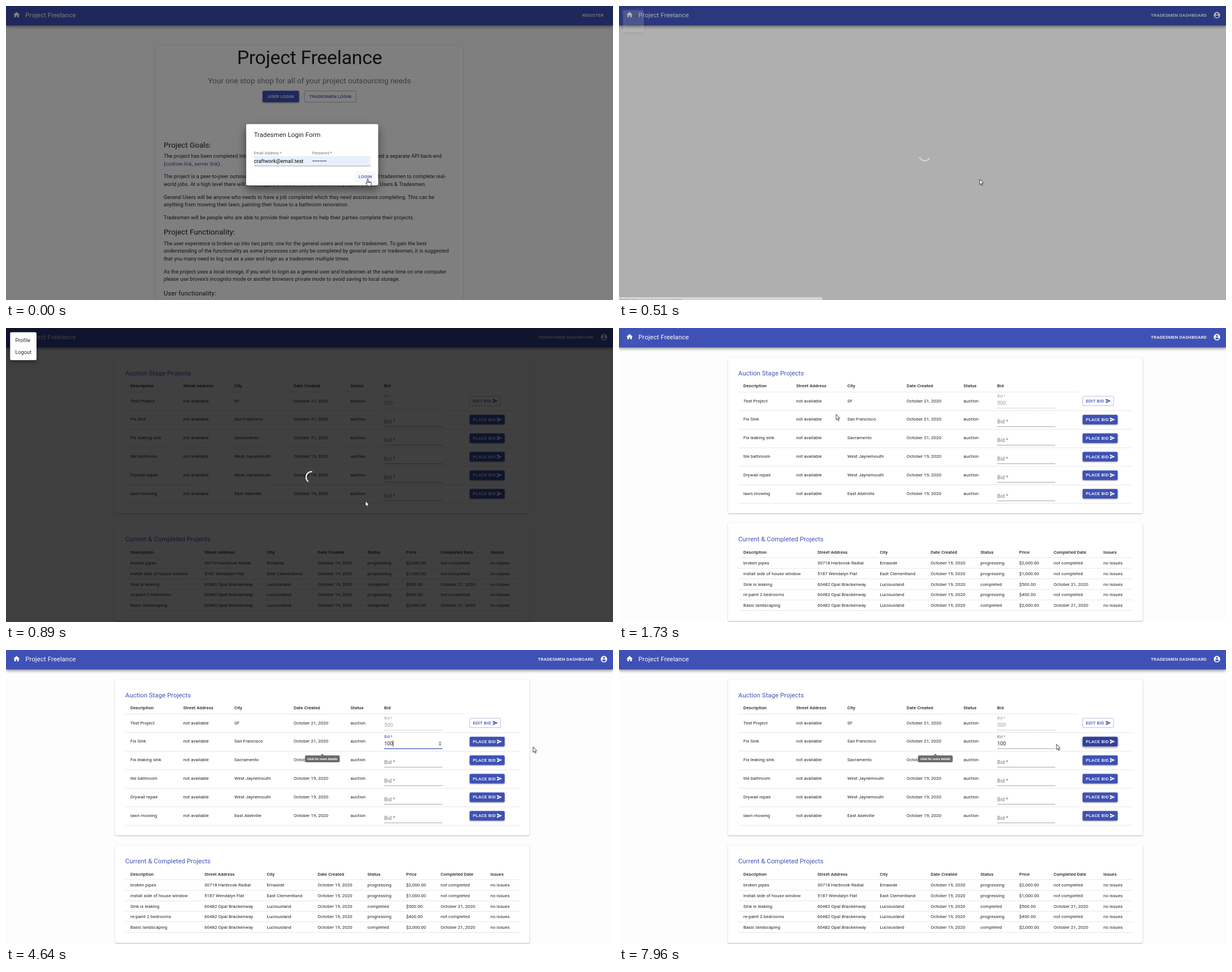
Recreate the animation shown at these times as an HTML page with a canvas. Size 1074 px wide and 521 px high, loop 8 s.

```html
<!DOCTYPE html>
<html lang="en">
<head>
<meta charset="utf-8">
<title>Tradesmen dashboard</title>
<style>
html, body { margin: 0; width: 100%; height: 100%; overflow: hidden; background: #fdfdfd; }
canvas { display: block; width: 1074px; height: 521px; }
</style>
</head>
<body>
<canvas id="stage" width="1074" height="521"></canvas>
<script>
const ctx = document.getElementById('stage').getContext('2d');
const W = 1074, H = 521, LOOP = 8000;
const S = 0.5645; // page zoom: CSS px to stage px
const BLUE = '#3f51b5', DARK = '#303f9f', INK = 'rgba(0,0,0,.87)', SOFT = 'rgba(0,0,0,.54)', OFF = 'rgba(0,0,0,.38)';
const HINT = 'click for more details';

const ICON = {
  home: 'M10 20v-6h4v6h5v-8h3L12 3 2 12h3v8z',
  send: 'M2 21L23 12 2 3v7l15 2-15 2z',
  user: 'M12 2C6.5 2 2 6.5 2 12s4.5 10 10 10 10-4.5 10-10S17.5 2 12 2zm0 3c1.7 0 3 1.3 3 3s-1.3 3-3 3-3-1.3-3-3 1.3-3 3-3zm0 14.2c-2.5 0-4.7-1.3-6-3.2 0-2 4-3.1 6-3.1s6 1.1 6 3.1c-1.3 1.9-3.5 3.2-6 3.2z'
};
const ARROW = new Path2D('M0 0V9.6L2.2 7.6L3.8 11L5.3 10.4L3.8 7H6.6Z');
const HAND = new Path2D('M-1 1q1-1.5 2 0V5l4.6 1.1q1 .3.9 1.5l-.7 4.3q-.2 1-1 1h-4q-.9 0-1.5-.8l-2.7-4q-.2-1.2 1-1l1.4 1.1z');

// Event times
const LOGIN = 330, LOADED = 890, FOCUS = 2630, SAVE = 5560, EDIT = 7570;

// Pointer path: time, x, y
const TRACK = [
  [0, 640, 306], [60, 640, 306], [180, 640.5, 307], [330, 639, 307], [420, 639, 307],
  [740, 636, 307], [890, 636, 307], [1120, 637, 185], [1500, 340, 120], [1730, 383.5, 153],
  [1980, 540, 158], [2300, 852, 164], [2450, 855, 288], [2700, 728, 170], [2840, 728.5, 169],
  [2990, 732, 169], [4390, 732, 169], [4470, 754, 168], [4640, 932.5, 171.5], [4850, 974, 225],
  [5000, 950, 288], [5250, 870, 200], [5410, 850.5, 160], [6240, 851, 160], [6500, 720, 166],
  [6650, 640, 170], [7040, 849, 166], [7270, 851, 162], [7570, 851, 162], [7960, 774, 167], [8000, 774, 167]
];

const AUCTION = {
  cols: [220, 313.5, 404, 509, 609.5, 669],
  head: ['Description', 'Street Address', 'City', 'Date Created', 'Status', 'Bid'],
  rows: [
    ['Test Project', 'SF', 21], ['Fix Sink', 'San Francisco', 21], ['Fix leaking sink', 'Sacramento', 21],
    ['tile bathroom', 'West Jaynemouth', 19], ['Drywall repair', 'West Jaynemouth', 19], ['lawn mowing', 'East Abelville', 19]
  ].map(([what, city, day]) => [what, 'not available', city, `October ${day}, 2020`, 'auction'])
};
const OPAL = '60482 Opal Brackenway', MADE = 'October 19, 2020', DONE = 'October 21, 2020';
const CURRENT = {
  cols: [220, 351, 461.5, 551.5, 639.5, 708, 769, 857],
  head: ['Description', 'Street Address', 'City', 'Date Created', 'Status', 'Price', 'Completed Date', 'Issues'],
  rows: [
    ['broken pipes', '30718 Harbrook Radial', 'Ernaside', '$2,000.00'],
    ['install side of house window', '5187 Wendalyn Flat', 'East Clementland', '$1,000.00'],
    ['Sink is leaking', OPAL, 'Luciousland', '$500.00', DONE],
    ['re-paint 2 bedrooms', OPAL, 'Luciousland', '$400.00'],
    ['Basic landscaping', OPAL, 'Luciousland', '$2,000.00', DONE]
  ].map(([what, street, city, price, done]) =>
    [what, street, city, MADE, done ? 'completed' : 'progressing', price, done || 'not completed', 'no issues'])
};

const ramp = (t, a, b) => Math.min(1, Math.max(0, (t - a) / (b - a)));
const within = (t, a, b) => t >= a && t < b;
const rowY = i => 129 + 32.85 * i;

// y is the middle of the capitals; size is in CSS px
function text(s, x, y, size, color, { weight = 400, gap = 0.01, align = 'left', face = 'Roboto' } = {}) {
  const px = size * S;
  ctx.font = `${weight} ${px}px ${face}, sans-serif`;
  ctx.letterSpacing = `${gap * px}px`;
  ctx.textAlign = align;
  ctx.fillStyle = color;
  ctx.fillText(s, x, y + 0.356 * px);
  return ctx.measureText(s).width;
}

function box(x, y, w, h, r, fill, shadow) {
  ctx.save();
  if (shadow) {
    [ctx.shadowOffsetY, ctx.shadowBlur] = shadow;
    ctx.shadowColor = `rgba(0,0,0,${shadow[2]})`;
  }
  ctx.fillStyle = fill;
  ctx.beginPath();
  ctx.roundRect(x, y, w, h, r);
  ctx.fill();
  ctx.restore();
}

function frame(x, y, w, h, r, color, width = 0.7) {
  ctx.strokeStyle = color;
  ctx.lineWidth = width;
  ctx.beginPath();
  ctx.roundRect(x, y, w, h, r);
  ctx.stroke();
}

function line(x1, x2, y, color, width = 0.8, dash = []) {
  ctx.strokeStyle = color;
  ctx.lineWidth = width;
  ctx.setLineDash(dash);
  ctx.beginPath();
  ctx.moveTo(x1, y);
  ctx.lineTo(x2, y);
  ctx.stroke();
  ctx.setLineDash([]);
}

function icon(name, cx, cy, size, color) {
  const k = size * S / 24;
  ctx.save();
  ctx.translate(cx, cy);
  ctx.scale(k, k);
  ctx.translate(-12, -12);
  ctx.fillStyle = color;
  ctx.fill(new Path2D(ICON[name]));
  ctx.restore();
}

function dim(alpha) {
  if (alpha <= 0) return;
  ctx.fillStyle = `rgba(0,0,0,${alpha})`;
  ctx.fillRect(0, 0, W, H);
}

// Draws scaled and faded around a point, for parts that grow in
function grown(k, cx, cy, draw) {
  if (k <= 0) return;
  const z = 0.75 + 0.25 * k;
  ctx.save();
  ctx.globalAlpha = k;
  ctx.translate(cx, cy);
  ctx.scale(z, z);
  ctx.translate(-cx, -cy);
  draw();
  ctx.restore();
}

const caps = (s, x, y, color, align) => text(s, x, y, 14, color, { weight: 500, gap: 0.02857, align });
const card = (x, y, w, h) => box(x, y, w, h, 2.2, '#fff', [0.8, 2, 0.34]);

function appBar(t) {
  box(0, -5, W, 39.5, 0, BLUE, [2, 5, 0.4]);
  const glow = t < LOGIN ? 0 : 0.05 * (1 - ramp(t, 1200, 1980));
  if (glow) box(5, 4, 38, 30, 2, `rgba(255,255,255,${glow})`);
  icon('home', 18.7, 15.5, 24, '#fff');
  text('Project Freelance', 34.3, 16.4, 20, '#fff', { gap: 0.0115 });
  if (t < LOGIN) return caps('REGISTER', 1057.5, 16, '#fff', 'right');
  caps('TRADESMEN DASHBOARD', 941, 16, '#fff');
  icon('user', 1058, 16.2, 24, '#fff');
}

function home() {
  const body = (s, y, end, x = 778.5) => {
    text(s, 279, y, 16, INK);
    if (end) text(end, x, y, 16, INK, { align: 'right' });
  };
  card(265, 70, 544, 600);
  text('Project Freelance', 537, 91, 60, INK, { gap: -0.00833, align: 'center' });
  text('Your one stop shop for all of your project outsourcing needs', 537, 132.2, 24, SOFT, { gap: 0, align: 'center' });
  box(454, 150.3, 64.5, 20.3, 2.2, BLUE, [1, 3, 0.4]);
  caps('USER LOGIN', 486.4, 160.3, '#fff', 'center');
  frame(528, 150.6, 91.8, 19.8, 2.2, 'rgba(63,81,181,.6)');
  caps('TRADESMEN LOGIN', 574, 160.3, BLUE, 'center');

  text('Project Goals:', 279, 246, 24, INK, { gap: 0 });
  body('The project has been completed into two parts;', 266, 'the client and a separate API back-end', 771);
  let x = 279;
  for (const [s, color] of [['(', INK], ['codrow link', BLUE], [', ', INK], ['server link', BLUE], [') .', INK]])
    x += text(s, x, 279.7, 16, color);
  body('The project is a peer-to-peer outsourcing app', 302, 'for users and tradesmen to complete real-');
  body('world jobs. At a high level there will be two types of users who will utilise this project: General Users & Tradesmen.', 315.7);
  body('General Users will be anyone who needs to have a job completed which they need assistance completing. This can be', 338.3);
  body('anything from mowing their lawn, painting their house to a bathroom renovation.', 352);
  body('Tradesmen will be people who are able to provide their expertise to help their parties complete their projects.', 374.7);
  text('Project Functionality:', 279, 400, 24, INK, { gap: 0 });
  body('The user experience is broken up into two parts: one for the general users and one for tradesmen. To gain the best', 420.5);
  body('understanding of the functionality as some processes can only be completed by general users or tradesmen, it is suggested', 434);
  body('that you many need to log out as a user and login as a tradesmen multiple times.', 447.6);
  body('As the project uses a local storage, if you wish to login as a general user and tradesmen at the same time on one computer', 470.3);
  body("please use brovex's incognito mode or another browsers private mode to avoid saving to local storage.", 484);
  text('User functionality:', 279, 509, 20, INK);
}

function loginDialog() {
  box(425, 209.3, 233.5, 108.7, 2.2, '#fff', [7, 16, 0.5]);
  text('Tradesmen Login Form', 438.7, 227.5, 20, INK, { gap: 0.0075 });
  text('Email Address *', 438.7, 260.8, 12, SOFT);
  text('Password *', 541.7, 260.8, 12, SOFT);
  box(438.7, 266, 206.3, 17.5, 0, '#e8f0fe');
  line(438.7, 645, 283.6, 'rgba(0,0,0,.42)');
  text('craftwork@email.test', 438.7, 274.3, 16, '#000');
  ctx.fillStyle = '#000';
  for (let i = 0; i < 8; i++) {
    ctx.beginPath();
    ctx.arc(543.6 + 3.15 * i, 274.6, 0.95, 0, 7);
    ctx.fill();
  }
  box(617.5, 292.6, 36.5, 20.3, 2.2, 'rgba(63,81,181,.04)');
  caps('LOGIN', 635.7, 302.6, BLUE, 'center');
}

function bidField(y, { value = '', off, focus, caret }) {
  const up = off || focus || value;
  const label = off ? OFF : focus ? BLUE : SOFT;
  if (up) text('Bid *', 669.2, y - 8, 12, label);
  else text('Bid *', 669.2, y + 4.3, 16, label);
  const w = value ? text(value, 669.2, y + 4.2, 16, off ? OFF : INK) : 0;
  if (off) line(669, 772, y + 13, 'rgba(0,0,0,.42)', 0.8, [1, 0.8]);
  else line(669, 772, y + 13, focus ? BLUE : 'rgba(0,0,0,.46)', focus ? 1.3 : 0.8);
  if (caret) box(669.2 + w, y - 1.5, 0.8, 11, 0, '#000');
  if (focus) {
    box(764.8, y - 0.5, 6.4, 9, 0, '#efefef');
    ctx.fillStyle = '#505050';
    ctx.fill(new Path2D(`M768 ${y + 1}l1.8 2h-3.6zM768 ${y + 7.2}l1.8-2h-3.6z`));
  }
}

function bidButton(y, edit, hover) {
  if (edit) {
    if (hover) box(820.5, y - 8, 54.5, 16.6, 2.2, 'rgba(63,81,181,.04)');
    frame(820.5, y - 8, 54.5, 16.6, 2.2, hover ? BLUE : 'rgba(63,81,181,.55)');
    caps('EDIT BID', 826, y + 0.2, BLUE);
    return icon('send', 865.7, y + 0.3, 18, BLUE);
  }
  box(820.3, y - 8, 62, 17, 2.2, hover ? DARK : BLUE, hover ? [1.5, 4, 0.5] : [1, 2.5, 0.4]);
  caps('PLACE BID', 826, y + 0.2, '#fff');
  icon('send', 873, y + 0.4, 18, '#fff');
}

function ripple(t, start, y, color) {
  const k = ramp(t, start, start + 300);
  if (k <= 0 || k >= 1) return;
  ctx.save();
  ctx.beginPath();
  ctx.roundRect(820.3, y - 8, 62, 17, 2.2);
  ctx.clip();
  ctx.globalAlpha = 0.3 * (1 - k);
  ctx.fillStyle = color;
  ctx.beginPath();
  ctx.arc(851, y, 6 + 40 * k, 0, 7);
  ctx.fill();
  ctx.restore();
}

function typed(t) {
  return t < 3770 ? '' : t < 4000 ? '1' : t < 4170 ? '10' : '100';
}

function caretOn(t) {
  const since = t < 3770 ? FOCUS : 4170;
  return Math.floor((t - since) / 530) % 2 === 0;
}

function fieldState(i, t) {
  if (i === 0) return { value: '500', off: true };
  if (i > 1) return {};
  if (within(t, SAVE, EDIT)) return { value: '100', off: true };
  const focus = within(t, FOCUS, 5480);
  return { value: typed(t), focus, caret: focus && caretOn(t) };
}

function tableHead({ cols, head }, y) {
  head.forEach((s, c) => text(s, cols[c], y, 14, INK, { weight: 500 }));
}

function tables(t, p) {
  card(193, 52.5, 733.5, 276);
  text('Auction Stage Projects', 211, 79.8, 20, BLUE, { gap: 0.0075 });
  tableHead(AUCTION, 102.6);
  line(211, 811.5, 113.5, '#e0e0e0');
  AUCTION.rows.forEach((row, i) => {
    const y = rowY(i);
    row.forEach((s, c) => text(s, AUCTION.cols[c], y - 0.2, 14, INK));
    bidField(y, fieldState(i, t));
    const edit = i === 0 || (i === 1 && within(t, SAVE, EDIT));
    bidButton(y, edit, overButton(p, i) || (i === 1 && t >= EDIT));
    line(211, 908.5, y + 17.5, '#e0e0e0');
  });
  ripple(t, 5480, rowY(1), t < SAVE ? '#fff' : BLUE);
  ripple(t, 7500, rowY(1), t < EDIT ? BLUE : '#fff');

  card(193, 346, 733.5, 173.3);
  text('Current & Completed Projects', 211, 374, 20, BLUE, { gap: 0.0075 });
  tableHead(CURRENT, 397);
  line(211, 908.5, 407, '#e0e0e0');
  CURRENT.rows.forEach((row, i) => {
    const y = 416.4 + 18.68 * i;
    row.forEach((s, c) => text(s, CURRENT.cols[c], y, 14, INK));
    line(211, 908.5, y + 9.5, '#e0e0e0');
  });
}

function menu() {
  box(7.3, 7.5, 46.7, 49.5, 2.2, '#fff', [3, 6, 0.4]);
  text('Profile', 16.4, 22, 16, INK);
  text('Logout', 16.4, 42.4, 16, INK);
}

function spinner(t) {
  const turn = (t - 740) / 1400 * Math.PI * 2;
  ctx.strokeStyle = '#fff';
  ctx.lineWidth = 2;
  ctx.beginPath();
  ctx.arc(541, 264.4, 10, Math.PI * 0.5 + turn, Math.PI * 1.27 + turn * 1.15);
  ctx.stroke();
}

function statusBar() {
  ctx.save();
  ctx.globalAlpha = 0.75;
  box(-3, 516, 363, 10, 2, '#dee1e6');
  text('Waiting for project-server.example...', 1, 521.8, 12, '#444', { face: 'Open Sans' });
  ctx.restore();
}

function rowTip() {
  box(529, 186.7, 61.5, 12.3, 2.2, 'rgba(97,97,97,.92)');
  ctx.fillStyle = 'rgba(97,97,97,.92)';
  ctx.fill(new Path2D('M556.8 186.7l3-3 3 3z'));
  text(HINT, 559.8, 192.9, 10, '#fff', { weight: 700, gap: 0, align: 'center' });
}

function nativeTip() {
  box(856, 169, 71.5, 13.7, 0, '#fff', [1, 2, 0.25]);
  frame(856.5, 169.5, 70.5, 12.7, 0, '#666', 0.9);
  text(HINT, 861, 176, 11.4, '#444', { face: 'Open Sans', gap: 0 });
}

function savedAlert() {
  box(472, 488.6, 140, 25.6, 2.2, '#edf7ed');
  ctx.strokeStyle = '#4caf50';
  ctx.lineWidth = 1;
  ctx.beginPath();
  ctx.arc(487.3, 501.2, 4.7, -0.5, 5.2);
  ctx.stroke();
  ctx.stroke(new Path2D('M485 500.8l2 2 4.6-4.8'));
  text('Bid Saved Successfully', 500.3, 501, 14, '#1e4620');
  ctx.strokeStyle = '#1e4620';
  ctx.stroke(new Path2D('M597.3 498.6l5.2 5.2m0-5.2l-5.2 5.2'));
}

function pointer(t) {
  const i = Math.max(1, TRACK.findIndex(k => k[0] > t));
  const [t0, x0, y0] = TRACK[i - 1], [t1, x1, y1] = TRACK[i];
  const k = ramp(t, t0, t1);
  return { x: x0 + (x1 - x0) * k, y: y0 + (y1 - y0) * k };
}

function overButton({ x, y }, i) {
  const right = i === 0 ? 875 : 882;
  return x > 820 && x < right && Math.abs(y - rowY(i)) < 8.6;
}

function cursor(t, p) {
  const ready = t >= LOADED;
  const link = t < LOGIN || (ready && AUCTION.rows.some((_, i) => overButton(p, i)));
  const locked = within(t, SAVE, EDIT);
  const field = ready && !locked && p.x > 669 && p.x < 750 && p.y > 152 && p.y < 176;
  ctx.save();
  ctx.translate(p.x, p.y);
  ctx.lineWidth = 0.8;
  ctx.strokeStyle = '#15152a';
  if (field) {
    ctx.stroke(new Path2D('M-2-5h1.4l.6.6.6-.6H2M0-4.4V4.4M-2 5h1.4l.6-.6.6.6H2'));
  } else {
    const shape = link ? HAND : ARROW;
    ctx.fillStyle = '#fff';
    ctx.fill(shape);
    ctx.stroke(shape);
    if (link) ctx.stroke(new Path2D('M1 5v2.6M2.8 5.6v2M4.5 6v1.8'));
  }
  ctx.restore();
}

function fade(alpha, draw) {
  if (alpha <= 0) return;
  ctx.save();
  ctx.globalAlpha = alpha;
  draw();
  ctx.restore();
}

function draw(t) {
  const p = pointer(t);
  ctx.fillStyle = '#fdfdfd';
  ctx.fillRect(0, 0, W, H);
  if (t < LOGIN) {
    home();
    appBar(t);
    dim(0.5);
    loginDialog();
  } else {
    if (t >= LOADED) tables(t, p);
    appBar(t);
    const load = ramp(t, 393, 620) - ramp(t, 890, 1085);
    const open = ramp(t, 480, 700) - ramp(t, 900, 1120);
    dim(0.5 * load);
    dim(0.5 * open);
    fade(load, () => spinner(t));
    grown(open, 7.3, 7.5, menu);
    if (within(t, 400, LOADED)) statusBar();
    fade(ramp(t, 2740, 2840) - ramp(t, 4650, 4760), rowTip);
    fade(ramp(t, 5330, 5410) - ramp(t, 5480, 5600), rowTip);
    fade(ramp(t, 6400, 6520), rowTip);
    const alert = ramp(t, 5640, 5880) - ramp(t, 7500, 7700);
    grown(alert, 542, 501, savedAlert);
    fade(ramp(t, 5790, 5870) - ramp(t, 6240, 6300), nativeTip);
  }
  cursor(t, p);
}

const start = performance.now();
function tick(now) {
  draw(Math.max(0, now - start) % LOOP);
  requestAnimationFrame(tick);
}
draw(0);
requestAnimationFrame(tick);
</script>
</body>
</html>
```
